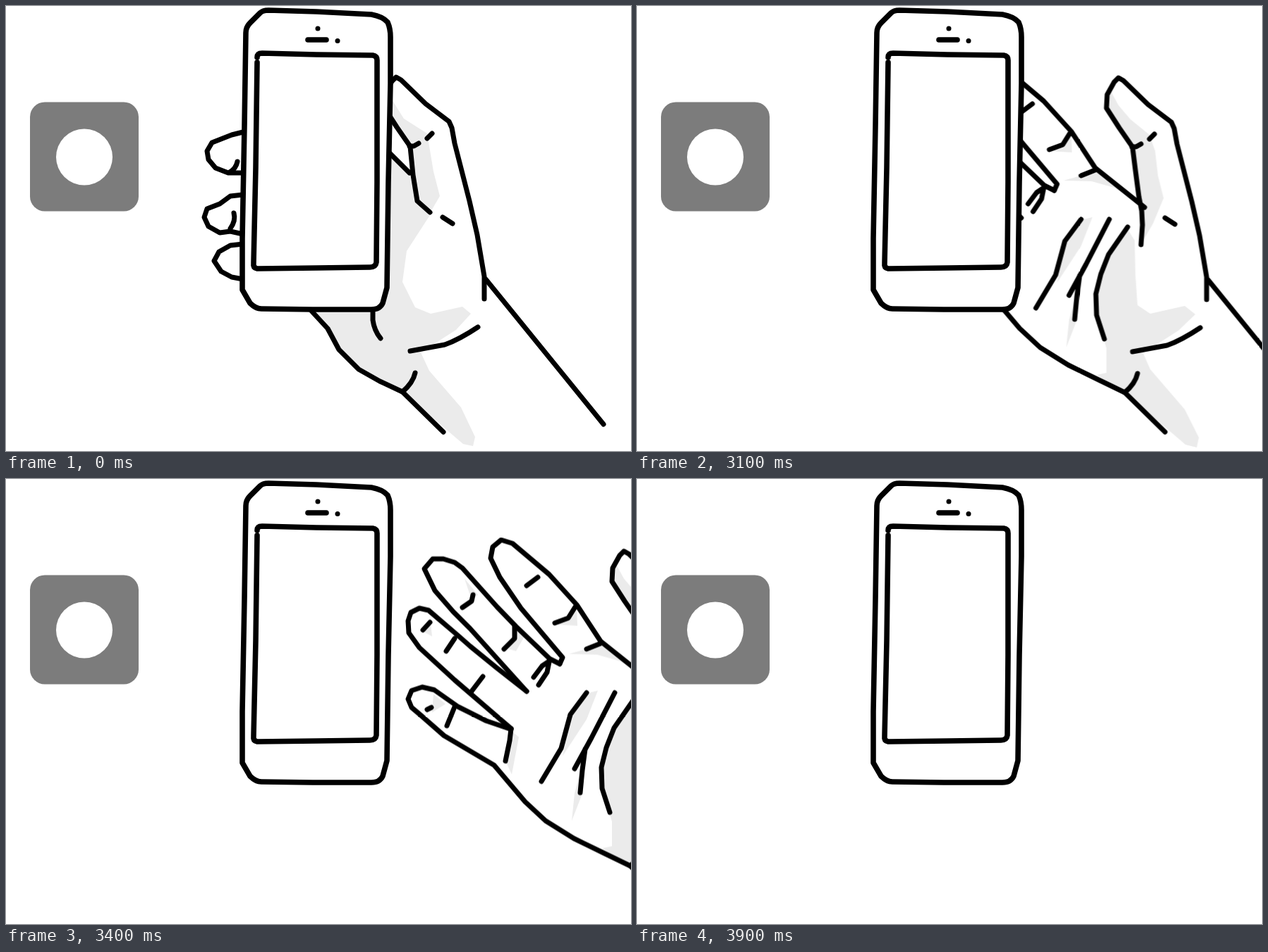
An HTML page that plays this animation: 886 px wide and 632 px high, repeating every 5 s.

```html
<!DOCTYPE html>
<html lang="en">
<head>
<meta charset="utf-8">
<title>Hand and phone</title>
<style>
  html, body { margin: 0; width: 100%; height: 100%; overflow: hidden; background: #fff; }
  svg { display: block; width: 886px; height: 632px; }
  path { fill: none; stroke: #000; stroke-width: 7; stroke-linecap: round; stroke-linejoin: round; }
  .shade path { fill: #ebebeb; stroke: none; }
  .phone path { stroke-width: 7.6; }
  .phone .body { fill: #fff; }

  .grip { animation: grip 5s step-end infinite; }
  .open { animation: open 5s step-end infinite, slide 5s infinite; }
  @keyframes grip { 0% { opacity: 1; } 20%, 100% { opacity: 0; } }
  @keyframes open { 0% { opacity: 0; } 20%, 100% { opacity: 1; } }
  /* ten hard 100 ms steps, the first one taken at once */
  @keyframes slide {
    0% { transform: translate(0.5px, 0.5px); }
    60% { transform: translate(0.5px, 0.5px); animation-timing-function: steps(10, start); }
    80%, 100% { transform: translate(645.5px, 2.5px); }
  }
</style>
</head>
<body>
<svg viewBox="0 0 886 632">
  <defs>
    <g id="thumb-and-wrist">
      <path d="M572 198L554 172L536 144L537 125L547 107L553 101L560 105L595 139L628 164L632 173L636 195L657 277L668 325L678 384V416"/>
      <path d="M572 199L578 199L585 195M597 188L604 181M619 300L633 309"/>
      <path d="M573 490L622 481Q642 474 669 456"/>
      <path d="M562 548Q577 535 580 521"/>
      <path d="M680 388L847 594"/>
    </g>
  </defs>

  <rect x="34" y="136.500" width="154" height="155" rx="21" fill="#7c7c7c"/>
  <circle cx="111" cy="214.500" r="40" fill="#fff"/>

  <g class="grip">
    <g class="shade">
      <path d="M540 130L549 136L564 160L597 181L606 235L615 270L601 294L583 277L573 200L540 156Z"/>
      <path d="M540 208L572 238L583 277L603 294L568 348L562 392L580 428L602 437L647 427L659 437L638 460L588 492L600 518L645 570L665 612L662 625L648 622L562 548L500 517L472 488L432 432L540 400Z"/>
    </g>
    <use href="#thumb-and-wrist"/>
    <path d="M573 200L577 240L583 277L601 293M540 205L572 237"/>
    <path d="M432 432L456 458L472 488L500 516L530 533L562 548L620 605"/>
    <path d="M520 430V446Q522 461 531 472"/>
    <path d="M336 179L320 183L292 194L285 206L287 218L297 230L315 237H334M328 221Q326 231 317 236"/>
    <path d="M336 268L318 270L303 281L285 288L281 300L287 313L303 322L318 320L336 324M323 294Q326 305 318 316"/>
    <path d="M336 338L318 340L302 349L295 362L305 377L320 385L336 388"/>
  </g>

  <g class="open">
    <g class="shade">
      <path d="M540 116L553 140L570 160L597 182L605 205L609 240L617 272L602 308L588 332L587 290L577 232L572 200L537 144Z"/>
      <path d="M566 316L576 332L577 380L580 424L598 436L647 425L662 437L638 460L588 492L598 515L647 572L667 612L664 626L648 622L562 548L522 523L536 520V485L522 440L521 408L539 352Z"/>
      <path d="M479 484L483 445L499 385L493 448Z"/>
      <path d="M500 303L516 299L500 340L466 392L478 333Z"/>
      <path d="M475 247L503 239L520 231L582 278L547 257L515 248Z"/>
      <path d="M455 205L487 207L486 180L472 198Z"/>
      <path d="M327 140L346 163L337 170Z"/>
      <path d="M398 210L412 222L400 243L390 240Z"/>
      <path d="M279 203L281 222L270 216Z"/>
      <path d="M283 304L300 318L281 330Z"/>
      <path d="M393 356L404 365L394 418L385 399Z"/>
    </g>
    <use href="#thumb-and-wrist"/>
    <path d="M573 200L577 232L582 270L586 290L587 310L585 338"/>
    <!-- index, middle, ring and little finger -->
    <path d="M590 285L520 229L486 177L447 134L395 90L379 85L367 95L364 111L377 138L407 182L466 252L462 261"/>
    <path d="M462 261L448 254L400 208L373 180L324 125L313 117L297 112L282 112L270 126L285 157L311 187L335 211L370 250L415 300"/>
    <path d="M415 300L373 267L335 236L318 221L276 185L263 182L251 188L247 200L248 217L263 238L313 284L393 353"/>
    <path d="M393 354L358 342L318 322L284 298L267 294L252 299L247 311L252 323L265 334L298 363L369 405L413 457L442 484L482 509L527 531L562 548L619 604"/>
    <path d="M393 353L391 370L385 399"/>
    <!-- creases -->
    <path d="M415 150L431 138M455 203L474 196L484 180M500 240L520 232"/>
    <path d="M324 181L337 172L339 163M383 240L398 225V208"/>
    <path d="M425 280L437 264L449 256M432 291L444 273L447 258"/>
    <path d="M268 213L278 202M301 243L313 225M337 300L353 279M302 349L313 322M274 326L280 323"/>
    <path d="M436 428L464 381L477 333L500 302"/>
    <path d="M483 410L507 366L540 302M491 444L494 412L498 382"/>
    <path d="M566 313L539 352L528 380L521 408L522 438L533 472"/>
  </g>

  <g class="phone">
    <path class="body" d="M340 38Q340 30 346 24L360 10Q364 6 372 6L440 8L518 12Q534 15 541 23Q545 32 545 44V110L542 250L540 400L534 422Q530 431 518 431H435L362 430Q354 430 346 422L335 403V330L338 170Z"/>
    <path d="M356 73Q356 67 363 67L440 69L520 70Q526 71 526 77V250L525 364Q524 371 516 371L440 372L356 373Q350 372 351 365L354 230L356 80"/>
    <path d="M428 48H454"/>
    <circle cx="442" cy="32" r="3.500"/>
    <circle cx="470" cy="49.500" r="3.500"/>
  </g>
</svg>
</body>
</html>
```
